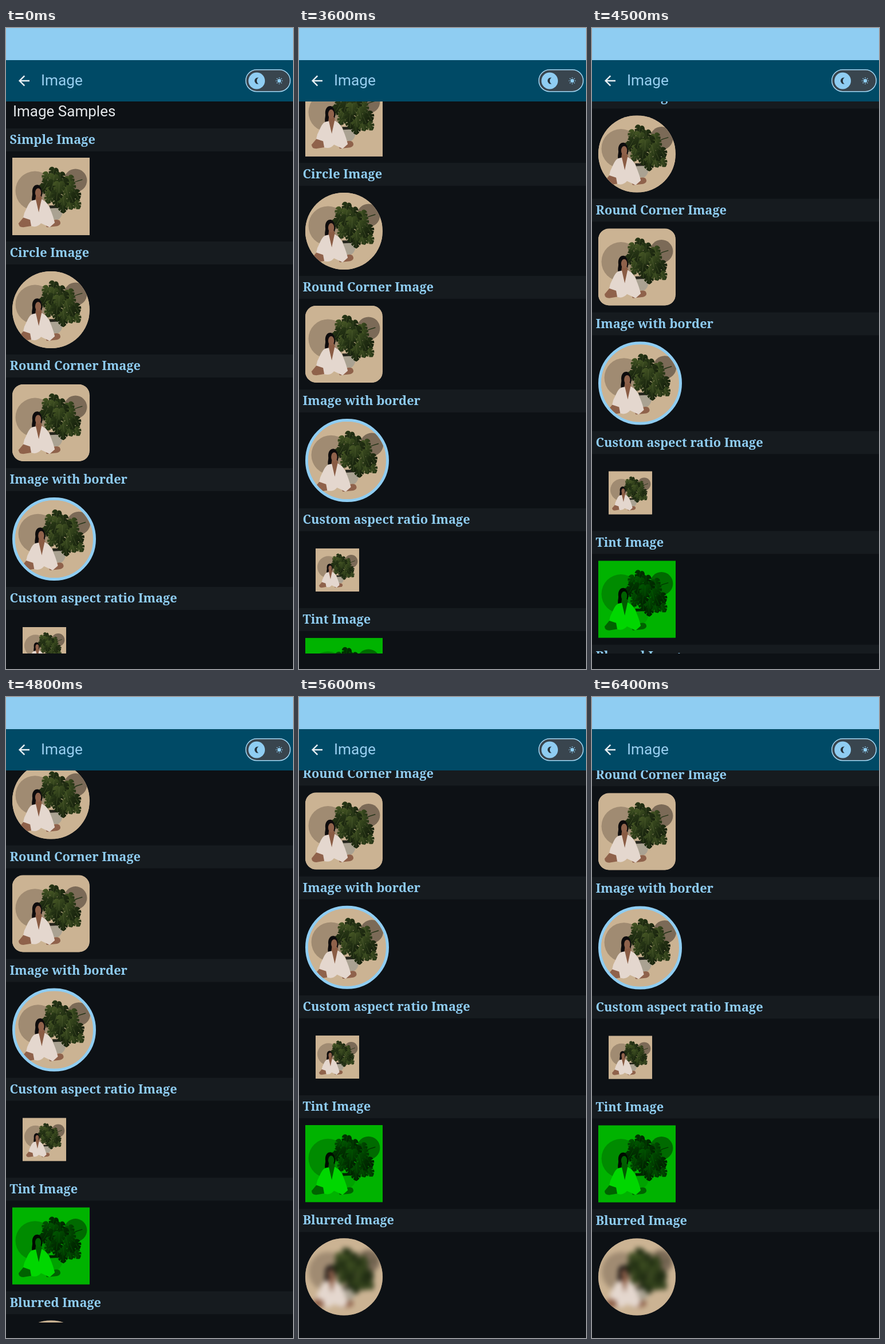
Recreate the animation shown at these times as an HTML page. Size 501x1117 px, loop 6500 ms.

```html
<!DOCTYPE html>
<html lang="en">
<head>
<meta charset="utf-8">
<title>Image samples</title>
<style>
  html, body { margin: 0; width: 100%; height: 100%; overflow: hidden; background: #0d1115; }
  #stage { position: relative; width: 501px; height: 1117px; overflow: hidden; background: #0d1115; }
  #status { height: 56px; background: #8fcdf2; }
  #bar { position: relative; height: 72px; background: #004a66; }
  #bar svg { position: absolute; left: 0; top: 0; }
  #bar span, #title { position: absolute; white-space: nowrap; font: 26.2px/36px Roboto, sans-serif; }
  #bar span { left: 61px; top: 17px; color: #98cff0; }
  #title { left: 12px; top: -1px; font-size: 26px; color: #e4e7ea; }
  #list { position: relative; height: 962px; overflow: hidden; }
  #view { height: 100%; transform-origin: 50% 100%; }
  #content { position: relative; padding-top: 47px; }
  h2 { height: 40px; margin: 0; padding-left: 6.5px; background: #161b1f; color: #8fcdf2;
       font: bold 21.75px/37px "Noto Serif", serif; white-space: nowrap; }
  .row { display: flow-root; }
  .pic { width: 134.4px; height: 134.4px; margin: 11.4px; overflow: hidden; background: #cbb393; }
  .pic svg { display: block; width: 100%; height: 100%; }
  .circle, .border { border-radius: 50%; }
  .round { border-radius: 19px; }
  .border { border: 5px solid #8fcdf2; width: 135.2px; height: 135.2px; }
  .small { width: 75.6px; height: 75.6px; margin: 29.2px; }
  .tint { background: #00b300; }
  .tint svg { filter: url(#green); }
  .blur svg { filter: blur(4px); }
</style>
</head>
<body>
<div id="stage">
  <svg width="0" height="0" style="position:absolute">
    <defs>
      <filter id="green" x="0" y="0" width="1" height="1" color-interpolation-filters="sRGB">
        <feColorMatrix values="0 0 0 0 0  0 1 0 0 0  0 0 0 0 0  0 0 0 1 0"/>
      </filter>
      <linearGradient id="leaf0" x2="1" y2="1"><stop stop-color="#2a3a17"/><stop offset="1" stop-color="#131c0b"/></linearGradient>
      <linearGradient id="leaf1" x2="1" y2="1"><stop stop-color="#4a5b27"/><stop offset="1" stop-color="#1a280f"/></linearGradient>
      <path id="leaf" d="M0-7C-3-12-11-9-11-1L-5-1-10.5 2Q-10 5-8 7L-3.5 3.5-6.5 8.5Q-4 11 0 13Q4 11 6.5 8.5L3.5 3.5 8 7Q10 5 10.5 2L5-1 11-1C11-9 3-12 0-7Z"/>
    </defs>
    <symbol id="art" viewBox="0 0 134 134">
      <rect width="134" height="134" fill="#cbb393"/>
      <circle cx="39.5" cy="57.5" r="34" fill="#a08b72"/>
      <circle cx="110" cy="39.5" r="20" fill="#7b6a57"/>
      <path d="M64 84H88Q89 103 79 108L69 107Z" fill="#aaa292"/>
      <path d="M64 83H87V87L66 88Z" fill="#25251d"/>
      <path d="M76 84Q82 48 122 38M76 84Q72 50 58 40M78 84Q90 70 104 76" fill="none" stroke="#26351a" stroke-width="1.5"/>
      <g id="plant"></g>
      <path d="M21 102L11 114Q11 121 19 121L37 118 33 107Z" fill="#8f624b"/>
      <path d="M58 117Q73 104 82 109Q87 116 78 119L60 121Z" fill="#8f624b"/>
      <path d="M44 47C36 47 34 55 35 62C35 68 32 72 37 81L43 76 50 71C54 64 52 48 44 47Z" fill="#0d0b0c"/>
      <path d="M41 66H50L53 76 46 98 40 74Z" fill="#8a5c44"/>
      <ellipse cx="45" cy="61" rx="5.2" ry="8" fill="#8f624b"/>
      <path d="M36 74C29 76 27 84 21 96L19 104 31 108 33 119Q43 122 50 114L65 121 74 113C72 104 64 80 57 76L51 72 46 95 41 73Z" fill="#e4d7ce"/>
    </symbol>
  </svg>

  <div id="status"></div>
  <div id="bar">
    <svg width="501" height="72">
      <path transform="translate(17.2 21.7) scale(1.19)" d="M20 11H7.83l5.59-5.59L12 4l-8 8 8 8 1.41-1.41L7.83 13H20z" fill="#e8f0f4"/>
      <rect x="418.7" y="16.7" width="77.4" height="38" rx="19" fill="#39454e" stroke="#a6d8f4" stroke-width="1.5"/>
      <circle cx="437.6" cy="36" r="14.4" fill="#8fcdf2"/>
      <path d="M441 30.6a5.6 5.6 0 1 0 0 10.8a6.2 6.2 0 0 1 0-10.8z" fill="#26333c"/>
      <circle cx="477" cy="36" r="3.2" fill="#8fcdf2"/>
      <circle cx="477" cy="36" r="5.3" fill="none" stroke="#8fcdf2" stroke-width="1.5" pathLength="16" stroke-dasharray=".7 1.3" stroke-dashoffset=".35"/>
    </svg>
    <span>Image</span>
  </div>
  <div id="list"><div id="view"><div id="content"><div id="title">Image Samples</div></div></div></div>
</div>
<script>
  const el = id => document.getElementById(id);

  // Leaves on a golden-angle spiral inside a tilted ellipse, outermost first
  function plant(count) {
    let leaves = '';
    for (let i = count; i > 0; i--) {
      const r = Math.sqrt(i / count), a = i * 2.4;
      const along = 38 * r * Math.cos(a), across = 27 * r * Math.sin(a);
      const x = 83 + (along + across) * Math.SQRT1_2;
      const y = 57 + (along - across) * Math.SQRT1_2;
      leaves += `<g transform="translate(${x} ${y}) rotate(${(83 - x) * 1.2}) scale(${1.05 - .25 * r})">
        <use href="#leaf" fill="url(#leaf${i % 2})"/>
        <path d="M0-7V11" stroke="#5d6c3b" stroke-width=".5"/></g>`;
    }
    return leaves;
  }
  el('plant').innerHTML = plant(22);

  const rows = {
    'Simple Image': 'plain',
    'Circle Image': 'circle',
    'Round Corner Image': 'round',
    'Image with border': 'border',
    'Custom aspect ratio Image': 'small',
    'Tint Image': 'tint',
    'Blurred Image': 'circle blur'
  };
  el('content').insertAdjacentHTML('beforeend', Object.entries(rows).map(([label, style]) =>
    `<h2>${label}</h2><div class="row"><div class="pic ${style}"><svg><use href="#art"/></svg></div></div>`).join(''));

  const LOOP = 6500, STEP = 100;
  const progress = (t, from, to) => Math.min(1, Math.max(0, (t - from) / (to - from)));
  const easeOut = u => 1 - (1 - u) ** 1.8;
  const easeInOut = u => (1 - Math.cos(Math.PI * u)) / 2;

  function draw() {
    const t = Math.floor(performance.now() % LOOP / STEP) * STEP;
    // Two drags, then the list stretches at its end and settles
    const scroll = 271.5 * easeOut(progress(t, 3170, 4500)) + 182 * easeInOut(progress(t, 4500, 5480));
    const stretch = .0024 * Math.sin(Math.PI * progress(t, 5450, 6400));
    el('content').style.transform = `translateY(${-scroll}px)`;
    el('view').style.transform = `scaleY(${1 + stretch})`;
    requestAnimationFrame(draw);
  }
  draw();
</script>
</body>
</html>
```
